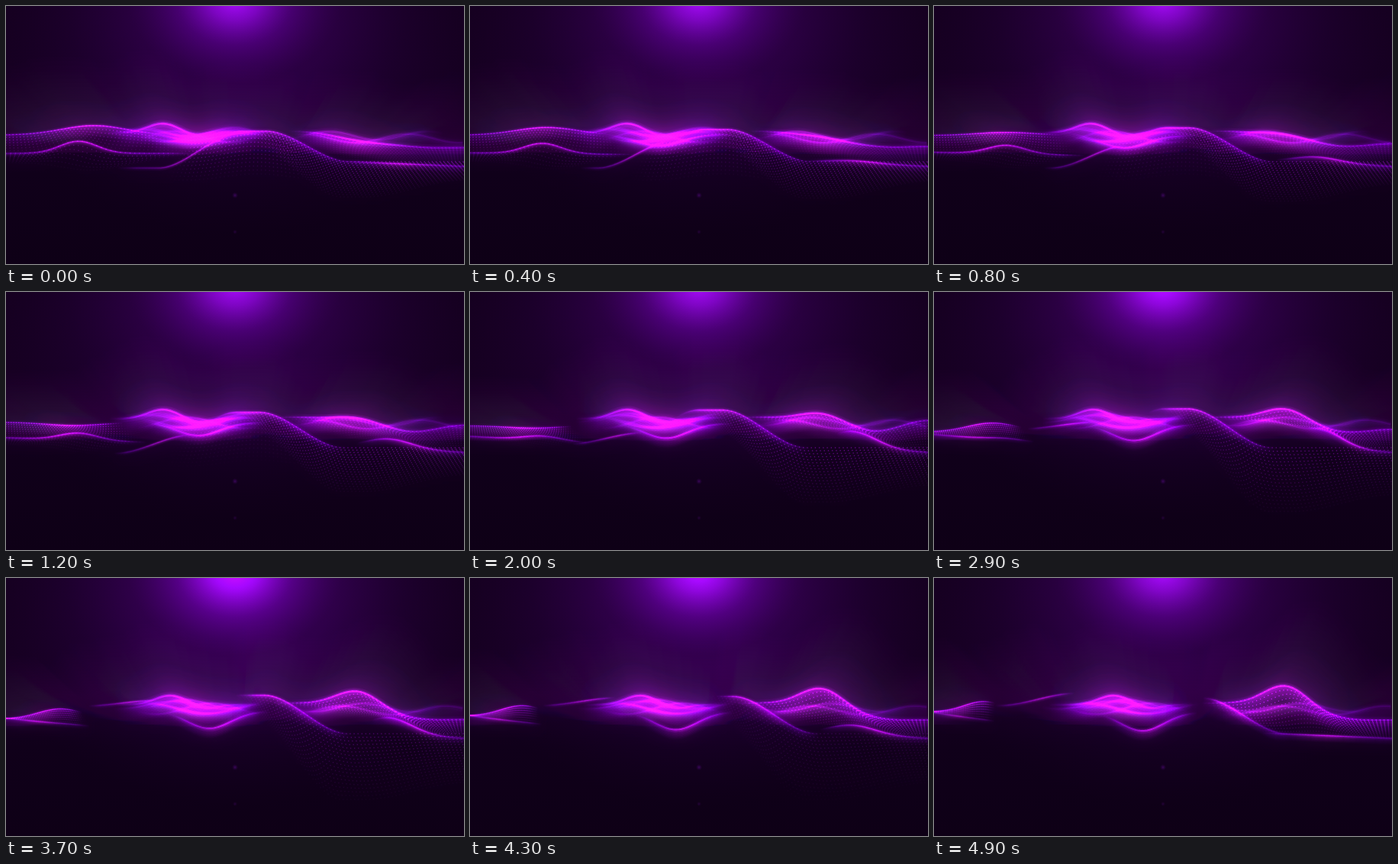
Animation, 600 px wide and 338 px high, one loop 5000 ms. Source, as an HTML page with a canvas:

```html
<!DOCTYPE html>
<html lang="en">
<head>
<meta charset="utf-8">
<title>Violet waves</title>
<style>
  html, body { margin: 0; width: 100%; height: 100%; overflow: hidden; background: #10001a; }
  canvas { display: block; width: 100vw; height: 100vh; }
</style>
</head>
<body>
<canvas id="stage" width="600" height="338"></canvas>
<script>
const W = 600, H = 338, LOOP = 5000, STEP = 100;
const ctx = document.getElementById('stage').getContext('2d');

function layer(w, h) {
  const c = document.createElement('canvas');
  c.width = w;
  c.height = h;
  return c.getContext('2d');
}
const waves = layer(W, H);
const haze = layer(W / 4, Math.ceil(H / 4));

const clamp = (v, lo = 0, hi = 1) => Math.min(hi, Math.max(lo, v));
const mix = (a, b, k) => a + (b - a) * k;
const smooth = u => { u = clamp(u); return u * u * (3 - 2 * u); };
const bump = (x, center, width) => Math.exp(-(((x - center) / width) ** 2));

let seed = 7;
const random = () => (seed = seed * 16807 % 2147483647) / 2147483647;
const between = (a, b) => mix(a, b, random());

// A shape has a span, a height and a strength; s runs from 0 to 1 over the loop.
// hot: brightest place along the span; depth: how far light spills below the fold
const shape = (look, span, y, power = () => .85) =>
  ({ width: 1.5, depth: 8, hot: .4, ...look, span, y, power });

const leftEnd = s => 210 - 130 * s ** .6;
const leftTop = shape({ depth: 14, hot: .5 },
  s => [0, leftEnd(s)],
  (x, s) => 169 + 16 * bump(s, .7, .3)
    + (21 * bump(s, .32, .17) - 13) * bump(x, 115 - 50 * Math.sqrt(s), 60 - 25 * s),
  s => .95 - .3 * s);

const leftLow = shape({ width: 1.2, depth: 5 },
  s => [0, leftEnd(s) + 40 * (1 - s)],
  (x, s) => 193 - 4 * s - 7 * s ** 4 + 8 * s * (x - 40) / 60
    - 16 * (1 - s) ** 2 * bump(x, 95, 35),
  s => .85 - .35 * s ** 3);

const leftFloor = shape({},
  s => [0, leftEnd(s) - 40],
  (x, s) => 205 + 10 * bump(x, 110, 50) - 20 * s,
  s => .4 * (1 - s / .5));

const tailEnd = s => 300 - 115 * Math.sqrt(s);
const tail = shape({ width: 1.2, depth: 4, hot: .6 },
  s => [145 - 65 * s * s, tailEnd(s)],
  (x, s) => 212 - 45 * smooth((s - .2) / .6)
    - (42 * (1 - s) ** 2 + 16 * s ** 4) * smooth((x - tailEnd(s) + 100) / 100),
  () => .65);

const middle = shape({ width: 2, depth: 12, hot: .5 },
  s => [185 + 35 * s, 345],
  (x, s) => 166 + 10 * Math.sqrt(s) + (10 + 14 * Math.sqrt(s)) * bump(x, 245 + 28 * s, 40));

const back = shape({ width: 2.4, depth: 22, hot: .45 },
  s => [130 + 20 * s, 310 + 30 * s],
  (x, s) => {
    const peak = 205 + 30 * s ** 4;
    return 166 - 12 * bump(x, peak, 28) + 5 * bump(x, peak + 48, 20);
  });

const crestEdge = s => 340 - 60 * s * (1 - s) + 12 * s;
const crestTop = s => 164 - 11 * Math.sin(Math.PI * s * .8);
const crest = shape({ width: 1.6, depth: 10, hot: .3 },
  s => [crestEdge(s) - 65 * (1 - s ** 3), crestEdge(s) + 115],
  (x, s) => mix(crestTop(s), 204, smooth((x - crestEdge(s)) / 110))
    + 10 * (Math.max(0, crestEdge(s) - 30 - x) / 30) ** 2);

const dip = s => Math.sin(Math.PI * s ** 1.3);
const rightLow = shape({ hot: .5 },
  s => [430 + 60 * dip(s), 600],
  (x, s) => 203 + 7 * (x - 430) / 170 - 28 * dip(s) * bump(x, 500, 45));

const rightTop = shape({ width: 2.2, depth: 20, hot: .42 },
  s => [350 + 20 * bump(s, 0, .15), 600],
  (x, s) => mix(164, 186, smooth((x - 370) / 200))
    + (3 - 35 * s ** .8) * bump(x, 462, 42)
    - 18 * bump(s, .38, .2) * smooth((x - 520) / 80),
  () => .95);

// Blurred folds far behind the main ones
const wisp = (from, to, level) => {
  const x0 = from + between(0, 40), x1 = to - between(0, 30);
  const base = level + between(-5, 7), amp = between(4, 9);
  const length = between(15, 25), phase = between(0, 6), drift = between(2, 4);
  return shape({ width: 2.4, depth: 16, hot: between(.25, .7) },
    () => [x0, x1],
    (x, s) => base + amp * Math.sin(x / length + phase - drift * s),
    () => .42);
};
const wisps = [
  ...Array.from({ length: 5 }, () => wisp(140, 350, 168)),
  ...Array.from({ length: 2 }, () => wisp(340, 600, 174))
];

const RIDGES = [...wisps, back, rightTop, middle, leftTop, leftLow, tail, crest, rightLow];

// Dotted surfaces
const mound = shape({},
  () => [225, 400],
  x => 182 - 14 * bump(x, 325, 50));
const moundFloor = shape({},
  () => [205, 410],
  x => 224 + 4 * Math.sin(x / 30),
  s => .6 * (1 - s / .35));

const slope = shape({},
  s => [crestEdge(s) - 40, 604],
  crest.y);
const slopeFloor = shape({},
  s => [crestEdge(s) - 10, 625],
  (x, s) => mix(185, 250 + 40 * smooth(s / .7), smooth((x - 325) / 115))
    - 22 * smooth((x - 470) / 130),
  s => .62 * (1 - s ** 4));

const SHEETS = [
  { upper: leftTop, lower: leftLow, rows: 7, cols: 46, power: () => .6 },
  { upper: leftLow, lower: leftFloor, rows: 6, cols: 40, power: leftFloor.power },
  { upper: mound, lower: moundFloor, rows: 10, cols: 38, power: moundFloor.power },
  { upper: slope, lower: slopeFloor, rows: 18, cols: 60, power: slopeFloor.power },
  { upper: rightTop, lower: rightLow, rows: 12, cols: 48, power: s => .25 + .6 * s ** 1.5 }
];

const edgeFade = (x0, x1, u) =>
  (x0 > 4 ? smooth(u / .2) : 1) * (x1 < 596 ? smooth((1 - u) / .2) : 1);

function drawRidge(r, s) {
  const power = clamp(r.power(s)), [x0, x1] = r.span(s);
  const ink = waves.createLinearGradient(x0, 0, x1, 0);
  for (let i = 0; i <= 12; i++) {
    const u = i / 12, heat = bump(u, r.hot, .24);
    const alpha = edgeFade(x0, x1, u) * mix(.6, 1, heat);
    ink.addColorStop(u, `rgba(${mix(130, 205, heat)},${mix(0, 16, heat)},${mix(215, 235, heat)},${alpha})`);
  }
  const path = new Path2D();
  for (let i = 0; i <= 80; i++) {
    const x = mix(x0, x1, i / 80);
    path.lineTo(x, r.y(x, s));
  }
  waves.strokeStyle = ink;
  const line = (width, alpha, dy = 0) => {
    waves.lineWidth = width;
    waves.globalAlpha = alpha * power;
    waves.save();
    waves.translate(0, dy);
    waves.stroke(path);
    waves.restore();
  };
  for (let k = 1; k <= 8; k++) line(r.depth / 4, .17 * (1 - k / 9), r.depth * k / 8);
  line(r.width * 4, .1);
  line(r.width * 2.2, .2);
  line(r.width, .5);
}

function drawSheet({ upper, lower, rows, cols, power }, s) {
  const strength = clamp(power(s));
  if (!strength) return;
  const [a0, a1] = upper.span(s), [b0, b1] = lower.span(s);
  waves.fillStyle = '#b010e6';
  for (let i = 0; i <= cols; i++) {
    const u = i / cols, fade = edgeFade(a0, a1, u);
    const ax = mix(a0, a1, u), bx = mix(b0, b1, u);
    const ay = upper.y(ax, s), by = lower.y(bx, s);
    for (let j = 0; j <= rows; j++) {
      const v = j / rows;
      waves.globalAlpha = strength * fade * mix(.75, .08, v);
      waves.fillRect(mix(ax, bx, v) - .65, mix(ay, by, v) - .65, 1.3, 1.3);
    }
  }
}

function glow(x, y, rx, ry, stops) {
  ctx.save();
  ctx.translate(x, y);
  ctx.scale(rx, ry);
  const g = ctx.createRadialGradient(0, 0, 0, 0, 0, 1);
  stops.forEach(([at, rgb, a]) => g.addColorStop(at, `rgba(${rgb},${a})`));
  ctx.fillStyle = g;
  ctx.fillRect(-1, -1, 2, 2);
  ctx.restore();
}

function drawBackdrop(s) {
  const pulse = .78 + .22 * bump(s, .74, .18);
  ctx.globalCompositeOperation = 'source-over';
  ctx.globalAlpha = 1;
  const base = ctx.createLinearGradient(0, 0, 0, H);
  base.addColorStop(0, '#14001e');
  base.addColorStop(.45, '#160022');
  base.addColorStop(.65, '#10001a');
  base.addColorStop(1, '#0e0016');
  ctx.fillStyle = base;
  ctx.fillRect(0, 0, W, H);

  ctx.globalCompositeOperation = 'lighter';
  ctx.globalAlpha = pulse;
  glow(300, 0, 340, 300, [[0, '58,0,88', .8], [.4, '40,0,64', .65], [.65, '18,0,30', .5], [1, '8,0,12', 0]]);
  glow(300, -10, 140, 112, [[0, '150,15,225', 1], [.25, '115,8,180', .8],
                            [.55, '60,0,100', .5], [1, '30,0,50', 0]]);
  ctx.globalAlpha = 1;
  glow(300, 248, 4, 4, [[0, '80,15,120', .5], [1, '50,0,80', 0]]);
  glow(300, 296, 3, 3, [[0, '55,8,85', .4], [1, '40,0,60', 0]]);
}

function drawWaves(s) {
  waves.globalCompositeOperation = 'source-over';
  waves.clearRect(0, 0, W, H);
  waves.globalCompositeOperation = 'lighter';
  SHEETS.forEach(sheet => drawSheet(sheet, s));
  RIDGES.forEach(ridge => drawRidge(ridge, s));
  waves.globalAlpha = 1;

  const { width, height } = haze.canvas;
  haze.globalCompositeOperation = 'source-over';
  haze.clearRect(0, 0, width, height);
  haze.filter = 'blur(2px)';
  haze.drawImage(waves.canvas, 0, 0, W / 4, H / 4);
  haze.filter = 'none';
  ctx.globalAlpha = .38;
  ctx.drawImage(haze.canvas, 0, 0, width * 4, height * 4);

  // Light rays: the haze above the waves, stretched upwards and outwards
  const cut = haze.createLinearGradient(0, 40, 0, 48);
  cut.addColorStop(0, 'rgba(0,0,0,0)');
  cut.addColorStop(1, '#000');
  haze.globalCompositeOperation = 'destination-out';
  haze.fillStyle = cut;
  haze.fillRect(0, 0, width, height);
  for (let k = 1; k <= 12; k++) {
    const sx = 1 + k * .02, sy = 1 + k * .1;
    ctx.globalAlpha = .07 * (1 - k / 13);
    ctx.drawImage(haze.canvas, 300 - 300 * sx, 192 - 192 * sy, width * 4 * sx, height * 4 * sy);
  }
  ctx.globalAlpha = 1;
  ctx.drawImage(waves.canvas, 0, 0);
}

function render(t) {
  const s = t / (LOOP - STEP);
  drawBackdrop(s);
  drawWaves(s);
}

const start = performance.now();
function tick() {
  const t = Math.max(0, performance.now() - start) % LOOP;
  render(Math.floor(t / STEP) * STEP);
  requestAnimationFrame(tick);
}
render(0);
requestAnimationFrame(tick);
</script>
</body>
</html>
```
